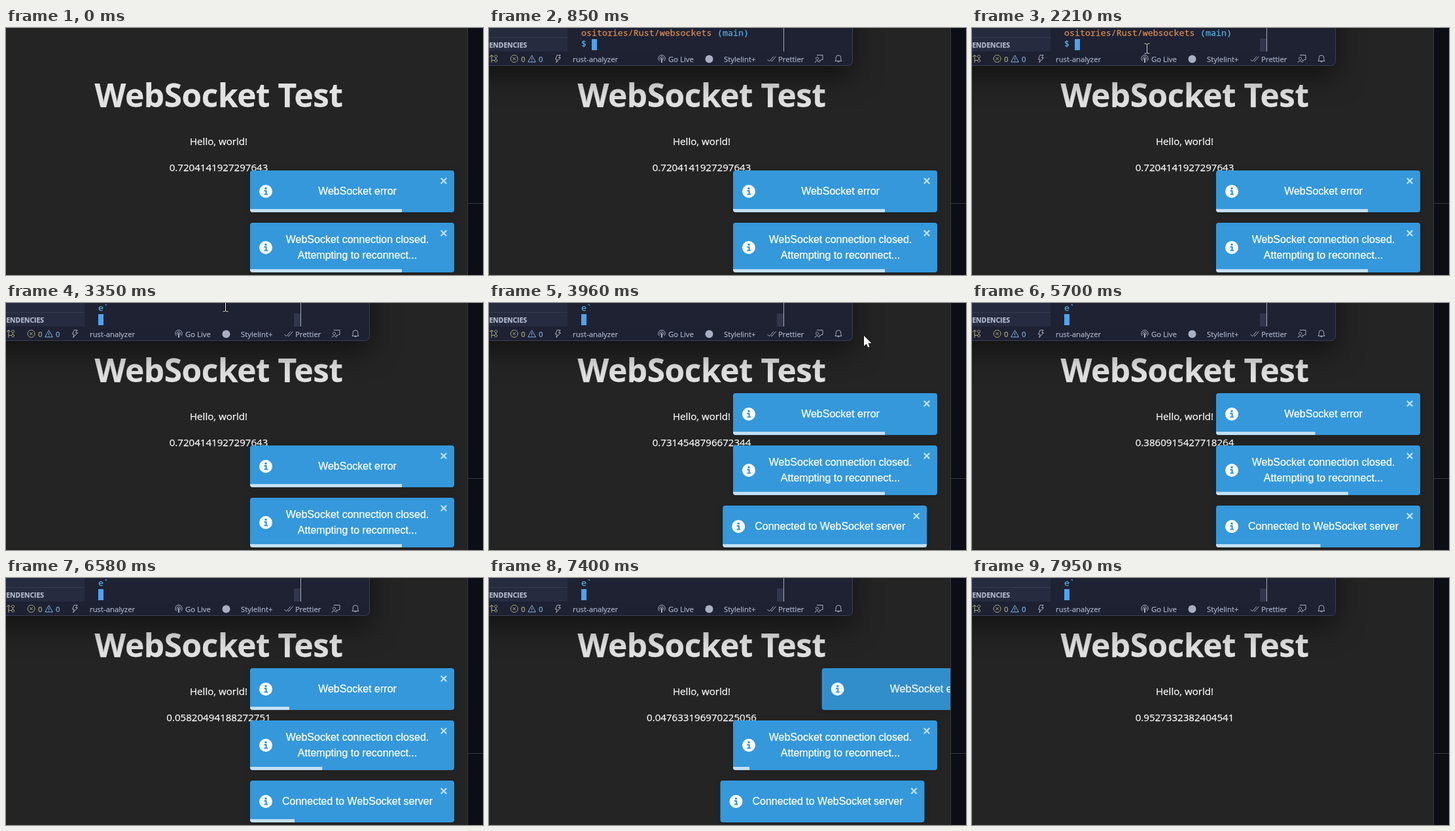
An HTML page with a canvas for the animation above (8 s loop, 729x378 px).

```html
<!DOCTYPE html>
<html lang="en">
<head>
<meta charset="utf-8">
<title>WebSocket Test</title>
<style>
html, body { margin: 0; width: 100%; height: 100%; overflow: hidden; background: #242424; }
canvas { display: block; }
</style>
</head>
<body>
<canvas id="stage" width="729" height="378"></canvas>
<script>
const ctx = document.getElementById('stage').getContext('2d');
const LOOP = 8000;
const PAGE_W = 705;
const UI = '"Open Sans", "Noto Sans", sans-serif';
const MONO = '"Noto Sans Mono", "DejaVu Sans Mono", monospace';
const ARIAL = '"Liberation Sans", Arial, sans-serif';

function bezier(x1, y1, x2, y2) {
  const at = (a, b, s) => 3 * a * s * (1 - s) ** 2 + 3 * b * s * s * (1 - s) + s ** 3;
  return x => {
    let lo = 0, hi = 1;
    for (let i = 0; i < 24; i++) {
      const mid = (lo + hi) / 2;
      if (at(x1, x2, mid) < x) lo = mid; else hi = mid;
    }
    return at(y1, y2, lo);
  };
}
const ease = bezier(.25, .1, .25, 1);
const easeOut = bezier(.215, .61, .355, 1);
const clamp = v => Math.max(0, Math.min(1, v));

// Keys are [time, ...values]; returns the interpolated values.
function track(keys, t, easing = p => p) {
  if (t <= keys[0][0]) return keys[0].slice(1);
  for (let i = 1; i < keys.length; i++) {
    const a = keys[i - 1], b = keys[i];
    if (t < b[0]) {
      const p = easing((t - a[0]) / (b[0] - a[0]));
      return a.slice(1).map((v, k) => v + (b[k + 1] - v) * p);
    }
  }
  return keys[keys.length - 1].slice(1);
}

// A hairline outline gives the text a slightly heavier weight.
function text(str, x, y, font, color, align = 'left', spacing = 0) {
  ctx.font = font;
  ctx.fillStyle = ctx.strokeStyle = color;
  ctx.lineWidth = .25;
  ctx.lineJoin = 'round';
  ctx.textAlign = align;
  ctx.letterSpacing = spacing + 'px';
  ctx.fillText(str, x, y);
  ctx.strokeText(str, x, y);
}
function rect(x, y, w, h, color) {
  ctx.fillStyle = color;
  ctx.fillRect(x, y, w, h);
}
function disc(x, y, r, color) {
  ctx.fillStyle = color;
  ctx.beginPath();
  ctx.arc(x, y, r, 0, 7);
  ctx.fill();
}
function stroke(path, color, width = 1) {
  ctx.strokeStyle = color;
  ctx.lineWidth = width;
  ctx.stroke(new Path2D(path));
}

// ---- page ----
const numbers = [
  [0, '0.7204141927297643'], [3930, '0.7314548796672344'],
  [4430, '0.4518237706918352'], [4930, '0.001095427775889335'],
  [5430, '0.3860915427718264'], [5930, '0.091427336185520847'],
  [6430, '0.05820494188272751'], [6930, '0.047633196970225056'],
  [7430, '0.2867190453382916'], [7930, '0.9527332382404541']
];

function drawPage(t) {
  rect(0, 0, 729, 378, '#242424');
  text('WebSocket Test', 325, 120.5, `bold 49.5px ${UI}`, '#e2e2e2', 'center', -.4);
  text('Hello, world!', 325, 179, `15.1px ${UI}`, '#fafafa', 'center');
  const current = numbers.filter(n => n[0] <= t).pop()[1];
  text(current, 325, 219, `15.1px ${UI}`, '#fafafa', 'center');
}

function drawSide() {
  rect(705, 0, 24, 378, '#0c0e16');
  rect(705, 0, 1, 378, '#38393d');
  rect(706, 268, 23, 1, '#35373d');
}

// ---- toasts ----
const BAR_MS = 3000, ANIM_MS = 700, TOAST_W = 312;
const JOIN = 3530;
const toasts = [
  { lines: ['WebSocket error'], y: 218, lift: 80, h: 64, bar: 232, run: 4926 },
  { lines: ['WebSocket connection closed.', 'Attempting to reconnect...'], y: 298, lift: 80, h: 76, bar: 232, run: 5410 },
  { lines: ['Connected to WebSocket server'], y: 310, lift: 0, h: 64, bar: 312, run: 4234, enter: JOIN }
];

function toastPose(toast, t) {
  const leave = toast.run + toast.bar / TOAST_W * BAR_MS + 54;
  if (t >= leave) {
    return track([[0, 0, 1], [.2, -20, 1], [1, 2000, 0]], (t - leave) / ANIM_MS, ease);
  }
  if (toast.enter) {
    const keys = [[0, 3000, 0], [.6, -25, 1], [.75, 10, 1], [.9, -5, 1], [1, 0, 1]];
    return track(keys, (t - toast.enter) / ANIM_MS, easeOut);
  }
  return [0, 1];
}

function drawToast(toast, t) {
  const [dx, alpha] = toastPose(toast, t);
  if (dx > 345) return;
  const { h, lines } = toast;
  ctx.save();
  ctx.globalAlpha = alpha;
  ctx.translate(373 + dx, toast.y - (t >= JOIN ? toast.lift : 0));
  ctx.beginPath();
  ctx.roundRect(0, 0, TOAST_W, h, 4);
  ctx.fillStyle = '#3498db';
  ctx.shadowColor = 'rgba(0,0,0,.15)';
  ctx.shadowBlur = 10;
  ctx.shadowOffsetY = 1;
  ctx.fill();
  ctx.shadowColor = 'transparent';
  ctx.clip();

  disc(24, h / 2, 10, '#fff');
  disc(24, h / 2 - 4.5, 1.8, '#3498db');
  stroke(`M21.5 ${h / 2 - .8}H24.6V${h / 2 + 4.5}M21.5 ${h / 2 + 4.5}H27`, '#3498db', 2.2);

  const first = lines.length > 1 ? 31 : 37;
  lines.forEach((line, i) => text(line, 164, first + 24 * i, `16px ${ARIAL}`, '#fff', 'center'));
  stroke('M291.8 11.8L300.2 20.2M300.2 11.8L291.8 20.2', 'rgba(255,255,255,.7)', 2.3);

  const left = toast.bar - Math.max(0, t - toast.run) * TOAST_W / BAR_MS;
  if (left > 0) rect(0, h - 5, left, 5, 'rgba(255,255,255,.7)');
  ctx.restore();
}

// ---- editor ----
const MUTED = '#a9afc3', BLUE = '#55b1e3';

function drawTerminal(t) {
  const font = `13.3px ${MONO}`;
  const row = (str, x, y, color) => text(str, x, y, font, color);
  let caret = 141;
  if (t < 2670) {
    row('ositories/Rust/websockets', 141, 12, '#d98d55');
    row('(main)', 349, 12, BLUE);
    row('$', 141, 29, BLUE);
    caret = 157;
    if (t >= 2390) {
      row('cargo run', 157, 29, '#c5cae0');
      caret = 229;
    }
  } else if (t < 3100) {
    row('$', 141, 12, BLUE);
    row('cargo run', 157, 12, '#c5cae0');
  } else {
    row('e`', 141, 12, BLUE);
  }
  rect(caret, 17, 8, 17, '#4fa3ee');
  const hover = clamp((t - 1650) / 250);
  rect(440, 16, 10, 20, `rgba(62,68,96,${.6 * hover})`);
  rect(450, 0, 1, 36, '#a4a9b8');
}

function drawStatusBar() {
  const label = (str, x, color = MUTED) => text(str, x, 52, `11.35px ${UI}`, color);
  const olive = '#b0ae83', sky = '#83b3e2';

  stroke('M4 41.5V53M1 44L4 41.5L7 44M4 49.5H8.5', olive);
  stroke('M10.5 41.5a2 2 0 1 0 .1 0M10.5 48a2 2 0 1 0 .1 0M10.5 45.5V48', olive);
  stroke('M38.5 41.5a5.5 5.5 0 1 0 .1 0M36.3 44.8L40.7 49.2M40.7 44.8L36.3 49.2', olive);
  label('0', 49, olive);
  stroke('M65.5 41.8L71.3 52H59.7ZM65.5 45.5V49M65.5 50V51', sky);
  label('0', 76, sky);
  stroke('M104 41.5H109L106.5 45.5H109.5L102.5 53L104.3 48H101.5Z', MUTED);
  label('rust-analyzer', 128);

  stroke('M260.5 50.5a5.2 5.2 0 1 1 7 0M262 48.5a2.7 2.7 0 1 1 4 0', MUTED);
  stroke('M264 46V53', MUTED, 2);
  label('Go Live', 274);
  disc(336.5, 47.5, 6, MUTED);
  label('Stylelint+', 359);
  stroke('M425.5 48L428.5 51L435 43.5M431 50L432 51L438.5 43.5', MUTED);
  label('Prettier', 442);
  stroke('M501 41.5H510V48.5H508L505.5 51V48.5M501.5 44.5a2 2 0 1 0 .1 0M498 53a3.6 3.6 0 0 1 7 0', MUTED);
  stroke('M529 50.5H539L537.8 48.5V45.5a3.8 3.8 0 0 0 -7.6 0V48.5ZM532.7 51a1.4 1.4 0 0 0 2.7 0', MUTED);
}

function drawEditor(t) {
  ctx.save();
  ctx.beginPath();
  ctx.roundRect(-40, -60, 596, 118, 7);
  ctx.fillStyle = '#1e2233';
  ctx.shadowColor = 'rgba(0,0,0,.5)';
  ctx.shadowBlur = 42;
  ctx.shadowOffsetY = 16;
  ctx.fill();
  ctx.shadowColor = 'transparent';
  ctx.clip();
  rect(0, 0, 120, 36, '#262b40');
  rect(0, 14, 120, 1, '#363b50');
  text('ENDENCIES', 58, 30, `bold 10.4px ${UI}`, '#b3b9cc', 'right');
  drawTerminal(t);
  rect(0, 36, 556, 22, '#1d2132');
  drawStatusBar();
  ctx.restore();
  ctx.beginPath();
  ctx.roundRect(-40, -60, 595.5, 117.5, 7);
  ctx.strokeStyle = '#3c4052';
  ctx.lineWidth = 1;
  ctx.stroke();
}

// ---- mouse ----
const mousePath = [
  [1450, 3, 40], [1640, 70, 36], [1820, 190, 29], [2010, 264, 29], [2200, 264, 29],
  [2210, 267, 31], [2670, 267, 31], [2950, 335, 5], [3540, 335, 5],
  [3750, 450, 26], [3960, 573, 50], [4300, 610, 48], [4500, 714, 60],
  [4720, 690, 150], [4920, 606, 248], [5180, 606, 248], [5400, 686, 290], [5560, 686, 380]
];

function paint(path, width) {
  const shape = new Path2D(path);
  ctx.lineJoin = 'round';
  ctx.lineWidth = width;
  ctx.strokeStyle = '#000';
  ctx.fillStyle = '#fff';
  ctx.stroke(shape);
  ctx.fill(shape);
}

function drawMouse(t) {
  if (t < 1450 || t > 5560) return;
  const [x, y] = track(mousePath, t);
  const overToast = x > 373 && x < 685 && y > 138 && y < 374;
  const overTerminal = x > 120 && x < 440 && y < 36;
  ctx.save();
  ctx.translate(Math.round(x), Math.round(y));
  if (overTerminal) {
    const beam = 'M-3.5 -7H-1L.5 -6L2 -7H4.5M.5 -6V7M-3.5 8H-1L.5 7L2 8H4.5';
    stroke(beam, '#000', 2.6);
    stroke(beam, '#fff', 1);
  } else if (overToast) {
    paint('M-2 1a2 2 0 0 1 4 0V8q3 -1 4 1q3 -1 4 1q3 0 3 3V17q0 3 -2 5H0L-6 15q-2 -3 0 -4q2 0 4 3Z', 1.6);
    stroke('M2 8V12M6 9V12M10 10V13', '#000', 1);
  } else {
    paint('M0 0V16L3.8 12.5L6.2 18L8.8 17L6.4 11.5H11.5Z', 1.4);
  }
  ctx.restore();
}

function render(t) {
  drawPage(t);
  ctx.save();
  ctx.beginPath();
  ctx.rect(0, 0, PAGE_W, 378);
  ctx.clip();
  for (const toast of toasts) {
    if (!toast.enter || t >= toast.enter) drawToast(toast, t);
  }
  ctx.restore();
  drawSide();
  if (t >= 850) drawEditor(t);
  drawMouse(t);
}

let start;
function tick(now) {
  start ??= now;
  render((now - start) % LOOP);
  requestAnimationFrame(tick);
}
render(0);
requestAnimationFrame(tick);
</script>
</body>
</html>
```
